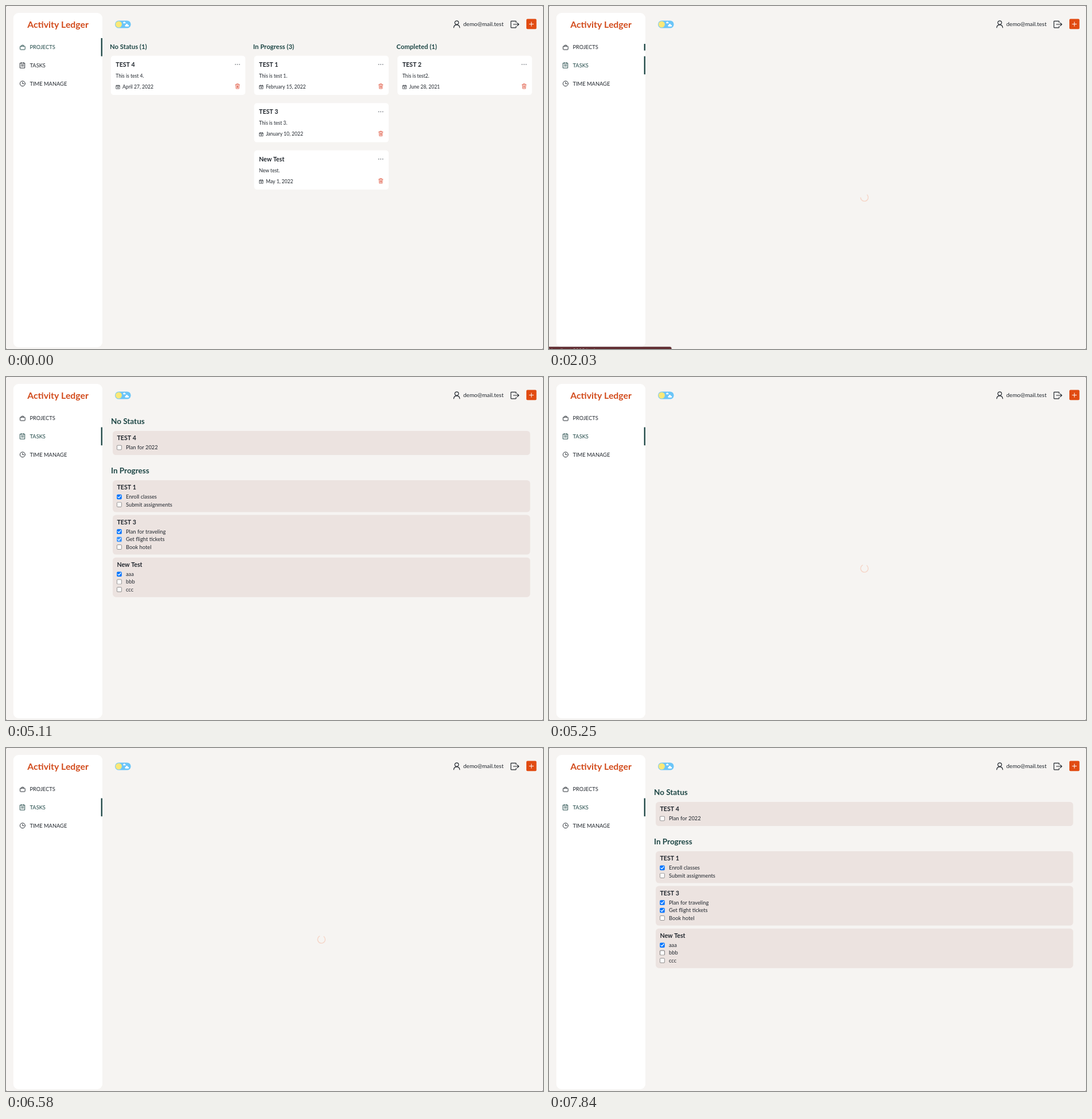
Write an HTML page with a canvas that moves like this. It is 936 by 598 pixels and loops after 8 s.

```html
<!DOCTYPE html>
<html lang="en">
<head>
<meta charset="utf-8">
<title>Task board</title>
<style>
html, body { margin: 0; width: 100%; height: 100%; overflow: hidden; background: #f6f4f2; }
canvas { display: block; width: 936px; height: 598px; }
</style>
</head>
<body>
<canvas id="stage"></canvas>
<script>
const W = 936, H = 598, LOOP = 8000, STEP = 70;
const TEAL = '#1d4645', INK = '#20262d', ORANGE = '#e14b12', RED = '#e2604b';
const canvas = document.getElementById('stage');
const ctx = canvas.getContext('2d');
const dpr = window.devicePixelRatio || 1;
canvas.width = W * dpr;
canvas.height = H * dpr;

const within = (t, a, b) => t >= a && t < b;
const ramp = (t, start, dur) => Math.min(1, Math.max(0, (t - start) / dur));
const ease = x => 1 - (1 - x) ** 1.6;

function text(str, x, y, size, color = INK, bold = false, align = 'left') {
  ctx.font = `${bold ? 700 : 400} ${size}px Lato, sans-serif`;
  ctx.fillStyle = color;
  ctx.textAlign = align;
  ctx.fillText(str, x, y);
}

function box(x, y, w, h, r, color) {
  ctx.fillStyle = color;
  ctx.beginPath();
  ctx.roundRect(x, y, w, h, r);
  ctx.fill();
}

function dot(x, y, r, color) {
  ctx.fillStyle = color;
  ctx.beginPath();
  ctx.arc(x, y, r, 0, Math.PI * 2);
  ctx.fill();
}

function line(d, x, y, color, width = 1) {
  ctx.save();
  ctx.translate(x, y);
  ctx.strokeStyle = color;
  ctx.lineWidth = width;
  ctx.lineCap = ctx.lineJoin = 'round';
  ctx.stroke(new Path2D(d));
  ctx.restore();
}

const ICON = {
  bag: 'M1 2.4h7.4q.6 0 .6 .6v4.4q0 .9-.9 .9h-6.8q-.9 0-.9-.9v-4.4q0-.6 .6-.6M2.8 2.2v-1.1q0-.6 .6-.6h2.6q.6 0 .6 .6v1.1',
  note: 'M.5 1.2h8v8.6h-8zM2.6 .3v1.8M6.4 .3v1.8M2.4 4.2h4.2M2.4 6.4h4.2',
  clock: 'M9.2 4.7a4.5 4.5 0 1 1-9 0a4.5 4.5 0 1 1 9 0M4.7 2.2v2.7h2.2',
  user: 'M9 3.6a3.3 3.3 0 1 1-6.6 0a3.3 3.3 0 1 1 6.6 0M.5 12.2q.4-4.9 5.2-4.9t5.2 4.9',
  exit: 'M9.5 3v-1.8q0-.7-.7-.7h-7.6q-.7 0-.7 .7v10.1q0 .7 .7 .7h7.6q.7 0 .7-.7v-1.8M4.8 6.2h9.4M11.6 3.6l2.7 2.6l-2.7 2.6',
  date: 'M.5 1.2h6v5.7h-6zM.5 2.5h6M2 .3v.9M5 .3v.9M3.5 3.7v2M2.5 4.7h2',
  trash: 'M.4 1.9h7.4M2.5 1.7v-1.2h3.2v1.2M1.1 2.1l.5 6.8h5l.5-6.8M3 3.8v3.4M4.1 3.8v3.4M5.2 3.8v3.4'
};

function drawHeader() {
  box(190, 25.4, 27.6, 13.2, 6.6, '#6bc5f8');
  dot(196.4, 32, 5.5, '#fbe878');
  box(204, 28.3, 4.6, 1.9, 1, '#fff');
  dot(206.2, 28.5, 1.2, '#fff');
  box(207.4, 33, 6.8, 2.7, 1.3, '#fff');
  dot(210.6, 32.8, 1.8, '#fff');

  line(ICON.user, 779.9, 25.5, INK, 1.2);
  text('demo@mail.test', 797, 35.3, 10);
  line(ICON.exit, 879.6, 25.8, INK, 1.2);
  box(907, 22.6, 17.6, 17.6, 2, ORANGE);
  line('M-3.6 0h7.2M0-3.6v7.2', 915.8, 31.6, '#fff', 1);
}

function drawBar(centerY, amount) {
  const h = 31.6 * amount;
  if (h > 0) {
    ctx.fillStyle = TEAL;
    ctx.fillRect(165.6, centerY - h / 2, 2.3, h);
  }
}

function drawSidebar(t) {
  box(12.8, 12, 155.2, 583, 9, '#fff');
  text('Activity Ledger', 90.5, 38, 15.8, '#d24b1c', true, 'center');
  const leave = ease(ramp(t, 1890, 300));
  const enter = ease(ramp(t, 910, 300));
  const items = [
    ['PROJECTS', 'bag', 67.8, 71.8, 1 - leave],
    ['TASKS', 'note', 98.3, 103.4, enter],
    ['TIME MANAGE', 'clock', 130.6, 135.2, 0]
  ];
  for (const [label, icon, iconY, y, active] of items) {
    const color = active > 0.5 ? TEAL : INK;
    line(ICON[icon], 24.2, iconY, color, 0.95);
    text(label, 41.5, y + 3.5, 9.3, color);
    drawBar(y, active);
  }
}

function drawCard(x, y, [title, note, date]) {
  box(x, y, 234.5, 68.3, 5, '#fff');
  text(title, x + 8.6, y + 18.9, 10.6, INK, true);
  for (let i = 0; i < 3; i++) dot(x + 217.2 + i * 3.5, y + 15, 0.9, '#747a80');
  text(note, x + 8.6, y + 37.8, 8.55);
  line(ICON.date, x + 9, y + 50.6, INK, 0.7);
  text(date, x + 20.4, y + 57, 8.55);
  line(ICON.trash, x + 216.7, y + 48.4, RED, 0.85);
}

const COLUMNS = [
  ['No Status (1)', [['TEST 4', 'This is test 4.', 'April 27, 2022']]],
  ['In Progress (3)', [
    ['TEST 1', 'This is test 1.', 'February 15, 2022'],
    ['TEST 3', 'This is test 3.', 'January 10, 2022'],
    ['New Test', 'New test.', 'May 1, 2022']
  ]],
  ['Completed (1)', [['TEST 2', 'This is test2.', 'June 28, 2021']]]
];

function drawProjects() {
  COLUMNS.forEach(([title, cards], i) => {
    const x = 182.7 + i * 249.8;
    text(title, x - 1.7, 74.5, 11.3, TEAL, true);
    cards.forEach((card, k) => drawCard(x, 86.8 + k * 82.5, card));
  });
}

const BLUE = { idle: '#0075ff', hover: '#005cc8', press: '#3793ff' };
const GRAY = { idle: '#767676', hover: '#4f4f4f', press: '#8d8d8d' };

function drawCheck(y, on, mood) {
  const x = 193.2, top = y - 4.2;
  if (on) {
    box(x, top, 8.5, 8.5, 1.6, BLUE[mood]);
    line('M1.8 4.5l1.8 1.7l3.2-4.1', x, top, '#fff', 1.3);
  } else {
    box(x, top, 8.5, 8.5, 1.6, GRAY[mood]);
    box(x + 0.7, top + 0.7, 7.1, 7.1, 1, '#fff');
  }
}

// Pointer state of the check boxes over time.
const MOODS = [
  ['Enroll classes', 3010, 4130, 'hover'],
  ['Get flight tickets', 4830, 5040, 'hover'],
  ['Get flight tickets', 5040, 5250, 'press'],
  ['Get flight tickets', 5250, 5740, 'hover'],
  ['Get flight tickets', 6230, 6930, 'hover'],
  ['Enroll classes', 7560, 7630, 'hover'],
  ['bbb', 7770, LOOP, 'hover']
];

const GROUPS = [
  ['TEST 4', 94, 42, [['Plan for 2022']]],
  ['TEST 1', 180, 55.6, [['Enroll classes', 1], ['Submit assignments']]],
  ['TEST 3', 240.6, 69, [['Plan for traveling', 1], ['Get flight tickets', 1], ['Book hotel']]],
  ['New Test', 314.7, 69, [['aaa', 1], ['bbb'], ['ccc']]]
];

function drawTasks(t) {
  text('No Status', 183, 81.7, 13.5, TEAL, true);
  text('In Progress', 183, 167.7, 13.5, TEAL, true);
  for (const [title, y, h, tasks] of GROUPS) {
    box(186, y, 727.6, h, 5.5, '#ece3e0');
    text(title, 193.5, y + 15.9, 10.6, INK, true);
    tasks.forEach(([label, done], i) => {
      const rowY = y + 28.9 + i * 13.45;
      const state = MOODS.find(m => m[0] === label && within(t, m[1], m[2]));
      const cleared = label === 'Get flight tickets' && within(t, 5250, 6580);
      drawCheck(rowY, done && !cleared, state ? state[3] : 'idle');
      text(label, 209, rowY + 3.3, 9.3);
    });
  }
}

const LOADS = [[1960, 2170], [5250, 5320], [6580, 6720]];

function drawSpinner(elapsed) {
  const start = -50 + elapsed * 0.1;
  const sweep = Math.max(60, 290 - elapsed);
  ctx.strokeStyle = '#f6d5c7';
  ctx.lineWidth = 1.4;
  ctx.lineCap = 'round';
  ctx.beginPath();
  ctx.arc(549.8, 333.8, 6.6, start * Math.PI / 180, (start + sweep) * Math.PI / 180);
  ctx.stroke();
}

function drawStatus(t) {
  const alpha = ramp(t, 910, 210) * (1 - ramp(t, 3010, 233));
  if (alpha <= 0) return;
  const width = 213.5 + 29 * ease(ramp(t, 2590, 280));
  ctx.save();
  ctx.globalAlpha = alpha;
  ctx.shadowColor = 'rgba(0,0,0,.3)';
  ctx.shadowBlur = 2 * dpr;
  box(-4, 594.3, width + 4, 12, 3, '#602b30');
  ctx.shadowColor = 'transparent';
  text(t < 2660 ? 'localhost:3000/tasks' : 'localhost:3000/time-manage', 4, 604, 9, '#b9a0a2');
  ctx.restore();
}

function drawCorners() {
  ctx.fillStyle = '#8b8a89';
  ctx.fillRect(0, 0, 1, 1);
  ctx.fillRect(W - 1, 0, 1, 1);
  ctx.fillRect(W - 1, H - 1, 1, 1);
  ctx.fillRect(0, H - 1, 1, 1);
}

function draw(t) {
  ctx.setTransform(dpr, 0, 0, dpr, 0, 0);
  ctx.fillStyle = '#f6f4f2';
  ctx.fillRect(0, 0, W, H);
  drawHeader();
  drawSidebar(t);
  const load = LOADS.find(([a, b]) => within(t, a, b));
  if (load) drawSpinner(t - load[0]);
  else if (t < 1960) drawProjects();
  else drawTasks(t);
  drawStatus(t);
  drawCorners();
}

const origin = performance.now();
function tick() {
  const t = (performance.now() - origin) % LOOP;
  draw(Math.floor(t / STEP) * STEP);
  requestAnimationFrame(tick);
}
tick();
</script>
</body>
</html>
```
